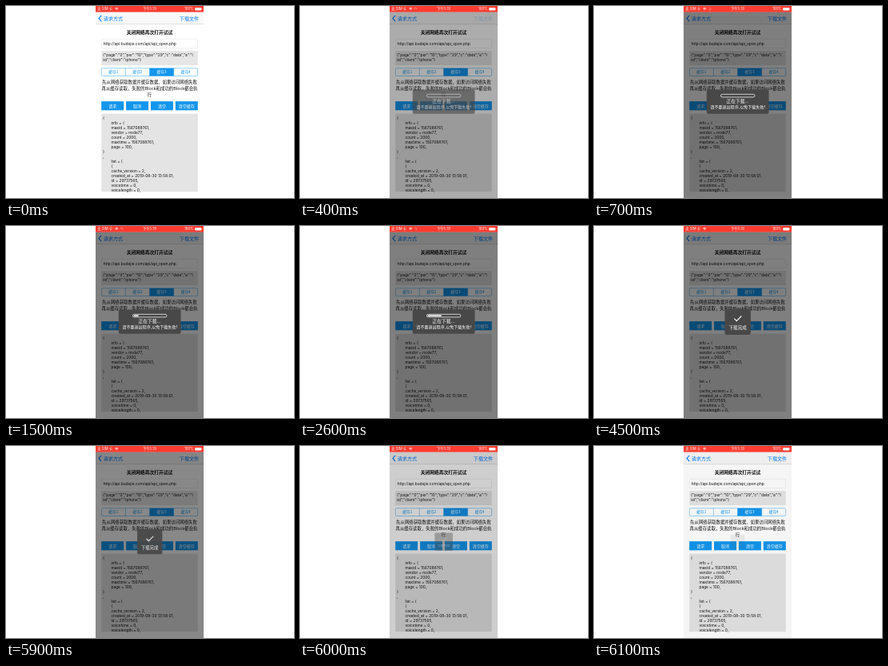
These frames come from a looping animation (360x240 px, 6200 ms). An HTML page with a canvas:

```html
<!DOCTYPE html>
<html lang="zh-CN">
<head>
<meta charset="utf-8">
<title>下载文件</title>
<style>
  html, body { margin: 0; width: 100%; height: 100%; overflow: hidden; background: #fff; }
  canvas { display: block; }
</style>
</head>
<body>
<canvas id="stage" width="360" height="240"></canvas>
<script>
const ctx = document.getElementById('stage').getContext('2d');
const LOOP = 6200, STEP = 100;
const POINT = 0.36, LEFT = 112, WIDTH = 375, HEIGHT = 667;
const BLUE = '#1296ee', TINT = '#007aff', RED = '#fe3b30', INK = '#111';
const CJK = '"Noto Sans CJK SC", "Noto Sans CJK", sans-serif';
const LATIN = 'Inter, ' + CJK;
const SHOW = 310, ROUND = 2900, DONE = 4400, HIDE = 5890;

const LOG = [
  [0, '{'], [1, 'info = {'], [1, 'maxid = 1567088761,'], [1, 'vendor = node77,'],
  [1, 'count = 2000,'], [1, 'maxtime = 1567088761,'], [1, 'page = 100,'],
  [0, '}'], [0, ','], [1, 'list = {'], [1, '{'], [1, 'cache_version = 2,'],
  [1, 'created_at = 2019-08-30 13:58:01,'], [1, 'id = 29737565,'],
  [1, 'voicetime = 0,'], [1, 'voicelength = 0,']
];

const clamp = v => Math.max(0, Math.min(1, v));
const phase = (t, start, length) => clamp((t - start) / length);
const easeOut = x => 1 - (1 - x) ** 2;

function text(str, x, y, size, { color = INK, align = 'left', weight = 400, family = CJK } = {}) {
  ctx.font = `${weight} ${size}px ${family}`;
  ctx.textAlign = align;
  ctx.textBaseline = 'middle';
  ctx.fillStyle = color;
  ctx.fillText(str, x, y);
}

function rect(x, y, w, h, color) {
  ctx.fillStyle = color;
  ctx.fillRect(x, y, w, h);
}

function rounded(x, y, w, h, r) {
  ctx.beginPath();
  ctx.roundRect(x, y, w, h, r);
}

function stroke(color, width) {
  ctx.strokeStyle = color;
  ctx.lineWidth = width;
  ctx.stroke();
}

function line(points, color, width) {
  ctx.beginPath();
  points.forEach(([x, y]) => ctx.lineTo(x, y));
  stroke(color, width);
}

function arc(x, y, r, from, to, color, width) {
  ctx.beginPath();
  ctx.arc(x, y, r, from, to);
  stroke(color, width);
}

function statusBar(t) {
  const white = { color: '#fff' };
  rect(0, 0, WIDTH, 21, RED);
  text('无 SIM 卡', 6, 10.5, 12, { ...white, family: LATIN });
  for (const r of [2, 5, 8]) arc(73, 14.5, r, -Math.PI * 0.75, -Math.PI * 0.25, '#fff', 2);
  if (t > SHOW && t < DONE) {
    const turn = t / 1000 * Math.PI * 2;
    arc(90, 10.5, 4, turn, turn + Math.PI * 1.3, 'rgba(255,255,255,.55)', 2);
  }
  text('下午5:39', WIDTH / 2, 10.5, 12, { ...white, align: 'center', weight: 500 });
  text('100%', 340, 10.5, 12, { ...white, align: 'right', family: LATIN });
  rounded(345, 6, 22, 9, 2);
  ctx.fillStyle = '#fff';
  ctx.fill();
  rect(368, 8.5, 2, 4, '#fff');
}

function navBar(t) {
  rect(0, 20, WIDTH, 44, '#f8f8f8');
  rect(0, 63, WIDTH, 1, '#b5b5b5');
  line([[20, 33], [11, 43], [20, 53]], TINT, 3);
  text('请求方式', 27, 43, 17, { color: TINT });
  const pressed = phase(t, 0, 200) * (1 - phase(t, 400, 300));
  ctx.globalAlpha = 1 - 0.75 * pressed;
  text('下载文件', 359, 43, 17, { color: TINT, align: 'right' });
  ctx.globalAlpha = 1;
}

function tabs() {
  rounded(20.5, 216, 334, 27, 4);
  stroke(BLUE, 1.2);
  const w = 335 / 4;
  for (let i = 0; i < 4; i++) {
    const x = 20 + i * w, active = i === 2;
    if (active) rect(x, 216, w, 27, BLUE);
    if (i) line([[x, 216], [x, 243]], BLUE, 1.2);
    text('缓存' + (i + 1), x + w / 2, 229.5, 13, { color: active ? '#fff' : BLUE, align: 'center' });
  }
}

function buttons() {
  ['请求', '取消', '清空', '清空缓存'].forEach((label, i) => {
    const x = 20 + i * 85.75;
    rect(x, 331, 77.75, 31, BLUE);
    text(label, x + 38.9, 346.5, 14, { color: '#fff', align: 'center' });
  });
}

function page(t) {
  const mid = { align: 'center' }, code = { family: LATIN };
  rect(0, 0, WIDTH, HEIGHT, '#fff');
  navBar(t);
  text('关闭网络再次打开试试', WIDTH / 2, 92, 16, { ...mid, weight: 700 });

  rounded(20.5, 114.5, 334, 32, 5);
  stroke('#d2d2d2', 1);
  text('http://api.budejie.com/api/api_open.php', 27, 131, 13.4, code);

  rect(20, 156, 335, 50, '#e6e6e6');
  text('{"page":"0","per":"10","type":"29","c":"data","a":"l', 25, 171, 13.3, code);
  text('ist","client":"iphone"}', 25, 188, 13.3, code);

  tabs();
  text('先从网络获取数据并缓存数据，如果访问网络失败', WIDTH / 2, 265, 15, mid);
  text('再从缓存读取，失败的Block和成功的Block都会执', WIDTH / 2, 286, 15, mid);
  text('行', WIDTH / 2, 307, 15, mid);
  buttons();

  rect(20, 374, 335, 271, '#e4e4e4');
  LOG.forEach(([indent, str], i) => text(str, 25 + indent * 29, 390.5 + i * 16.6, 13.4, code));
}

function progressAt(t) {
  return 0.5 * phase(t, 900, ROUND - 900) + 0.5 * phase(t, ROUND, DONE - ROUND);
}

function bezel(w, h) {
  rounded(-w / 2, -h / 2, w, h, 5);
  ctx.fillStyle = '#484848';
  ctx.fill();
}

function bar(y, progress) {
  rounded(-59, y - 5, 118, 10, 5);
  stroke('#fff', 2);
  ctx.save();
  rounded(-56, y - 2.5, 112, 5, 2.5);
  ctx.clip();
  rect(-56, y - 2.5, 112 * progress, 5, '#fff');
  ctx.restore();
}

function ring(y, progress) {
  const top = -Math.PI / 2;
  arc(0, y, 18, 0, Math.PI * 2, 'rgba(255,255,255,.1)', 2.4);
  arc(0, y, 18, top, top + Math.PI * 2 * progress, '#fff', 2.4);
}

function hud(t) {
  const label = { color: '#fff', align: 'center', weight: 500, family: LATIN };
  if (t >= DONE) {
    bezel(90, 90);
    line([[-12, -11], [-4, -3], [13, -20]], '#fff', 3);
    text('下载完成', 0, 21, 15.5, label);
    return;
  }
  const progress = progressAt(t), round = t >= ROUND, shift = round ? 12.5 : 0;
  bezel(216, round ? 110 : 84);
  if (round) ring(-21, progress);
  else bar(-21, progress);
  text('正在下载...', 0, -1 + shift, 16, label);
  text('请不要退出程序,以免下载失败!', 0, 18.5 + shift, 14, label);
}

function overlay(t) {
  const leaving = easeOut(phase(t, HIDE, 290));
  const shown = easeOut(phase(t, SHOW, 220)) * (1 - leaving);
  if (shown <= 0) return;
  ctx.globalAlpha = shown;
  rect(0, 20, WIDTH, HEIGHT - 20, 'rgba(0,0,0,.5)');
  ctx.save();
  ctx.translate(188, 332.5);
  ctx.scale(1 - leaving / 2, 1 - leaving / 2);
  hud(t);
  ctx.restore();
  ctx.globalAlpha = 1;
}

function draw(t) {
  rect(0, 0, 360, 240, '#fff');
  ctx.save();
  ctx.translate(LEFT, 0);
  ctx.scale(POINT, POINT);
  ctx.beginPath();
  ctx.rect(0, 0, WIDTH, HEIGHT);
  ctx.clip();
  page(t);
  overlay(t);
  statusBar(t);
  ctx.restore();
}

const start = performance.now();
function tick() {
  const t = (performance.now() - start) % LOOP;
  draw(Math.floor(t / STEP) * STEP);
  requestAnimationFrame(tick);
}
tick();
</script>
</body>
</html>
```
